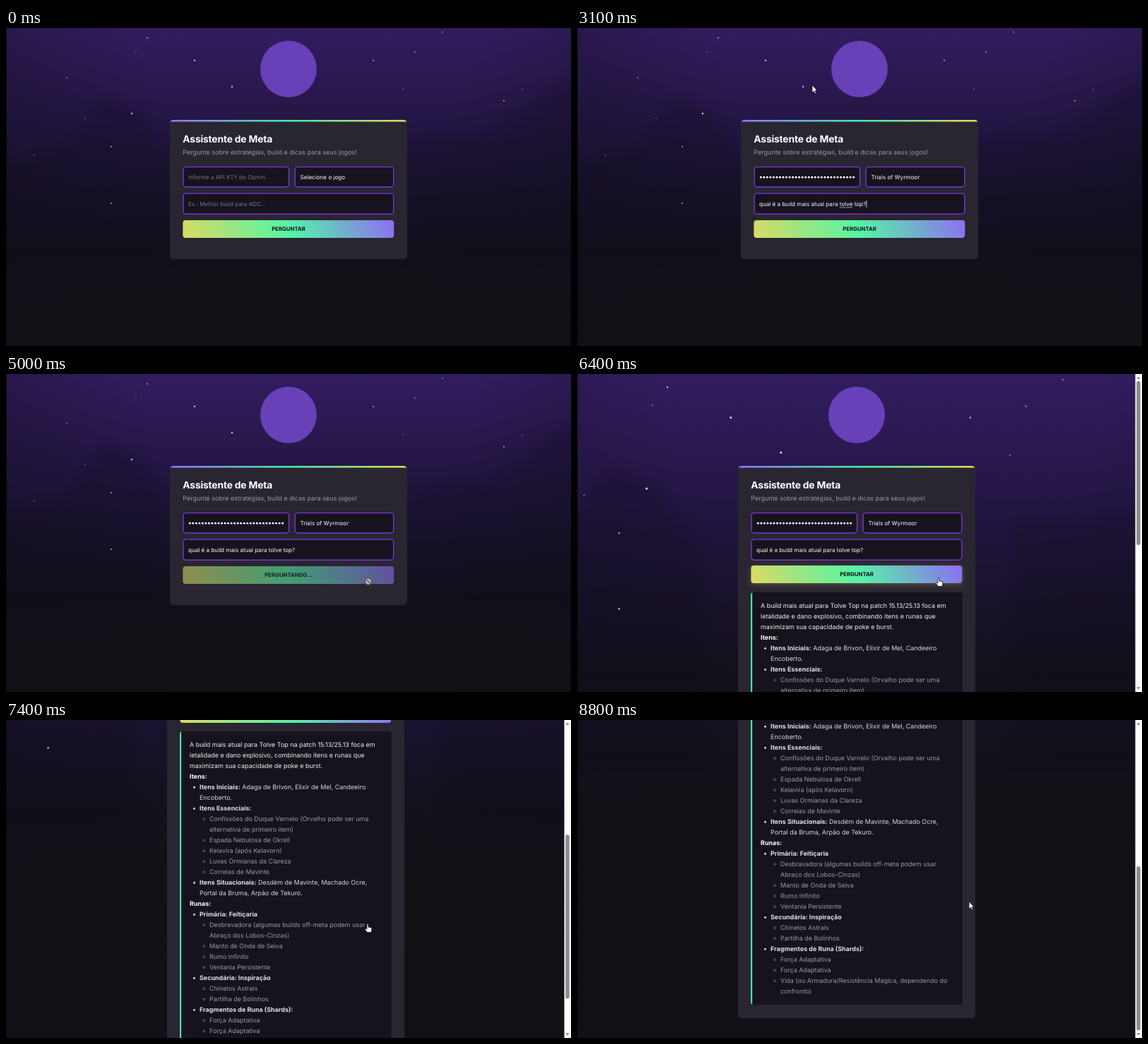
Write an HTML page with a canvas that moves like this. It is 800 px wide and 450 px high and loops after 8.9 s.

```html
<!DOCTYPE html>
<html lang="pt-BR">
<head>
<meta charset="utf-8">
<title>Assistente de Meta</title>
<style>
html, body { margin: 0; width: 100%; height: 100%; overflow: hidden; background: #121214; }
canvas { display: block; width: 800px; height: 450px; }
</style>
</head>
<body>
<canvas id="stage" width="800" height="450"></canvas>
<script>
const ctx = document.getElementById('stage').getContext('2d');
const LOOP = 8900, STEP = 100;
const KEY_AT = 400, SELECT_AT = 1400, FOCUS_AT = 1600, TYPE_END = 2800;
const ASK_AT = 3800, ANSWER_AT = 5900;
const VIEW = 450;
const QUESTION = 'qual é a build mais atual para tolve top?';
const WHITE = '#fafafa', FIELD = '#16131e', VIOLET = '#7936d6';

// Each answer line: level, bold part, regular part, whether it opens a bullet
const ANSWER = [
  [0, '', 'A build mais atual para Tolve Top na patch 15.13/25.13 foca em'],
  [0, '', 'letalidade e dano explosivo, combinando itens e runas que'],
  [0, '', 'maximizam sua capacidade de poke e burst.'],
  [0, 'Itens:', ''],
  [1, 'Itens Iniciais:', ' Adaga de Brivon, Elixir de Mel, Candeeiro', true],
  [1, '', 'Encoberto.'],
  [1, 'Itens Essenciais:', '', true],
  [2, '', 'Confissões do Duque Varnelo (Orvalho pode ser uma', true],
  [2, '', 'alternativa de primeiro item)'],
  [2, '', 'Espada Nebulosa de Okrell', true],
  [2, '', 'Kelavira (após Kelavorn)', true],
  [2, '', 'Luvas Ormianas da Clareza', true],
  [2, '', 'Correias de Mavinte', true],
  [1, 'Itens Situacionais:', ' Desdém de Mavinte, Machado Ocre,', true],
  [1, '', 'Portal da Bruma, Arpão de Tekuro.'],
  [0, 'Runas:', ''],
  [1, 'Primária: Feitiçaria', '', true],
  [2, '', 'Desbravadora (algumas builds off-meta podem usar', true],
  [2, '', 'Abraço dos Lobos-Cinzas)'],
  [2, '', 'Manto de Onda de Seiva', true],
  [2, '', 'Rumo Infinito', true],
  [2, '', 'Ventania Persistente', true],
  [1, 'Secundária: Inspiração', '', true],
  [2, '', 'Chinelos Astrais', true],
  [2, '', 'Partilha de Bolinhos', true],
  [1, 'Fragmentos de Runa (Shards):', '', true],
  [2, '', 'Força Adaptativa', true],
  [2, '', 'Força Adaptativa', true],
  [2, '', 'Vida (ou Armadura/Resistência Mágica, dependendo do', true],
  [2, '', 'confronto)'],
];

const STARS = [[267,46],[200,14],[520,46],[178,121],[149,168],[149,248],[320,83],[705,103],
  [731,87],[86,70],[184,33],[112,128],[618,6],[562,86],[40,180],[579,34]];

// Tracks of [time, values...]
const CURSOR = [[0,318,215],[500,318,215],[900,470,212],[1200,452,242],[1400,452,242],
  [1600,330,249],[2000,330,249],[2700,334,40],[3100,333,81],[3600,512,288],
  [8100,512,288],[8600,555,257]];
const SCROLL = [[0,0],[6500,0],[7400,293],[7700,293],[8400,379]];

function follow(track, t) {
  const next = track.findIndex(p => p[0] > t);
  if (next < 0) return track[track.length - 1].slice(1);
  const a = track[next - 1], b = track[next];
  const u = (t - a[0]) / (b[0] - a[0]), k = u * u * (3 - 2 * u);
  return a.slice(1).map((v, i) => v + (b[i + 1] - v) * k);
}

function box(x, y, w, h, r, fill, stroke) {
  ctx.beginPath();
  ctx.roundRect(x, y, w, h, r);
  if (fill) { ctx.fillStyle = fill; ctx.fill(); }
  if (stroke) { ctx.strokeStyle = stroke; ctx.lineWidth = 1.4; ctx.stroke(); }
}

function dot(x, y, r, fill) {
  ctx.beginPath();
  ctx.arc(x, y, r, 0, Math.PI * 2);
  ctx.fillStyle = fill;
  ctx.fill();
}

// Returns the x where the text ends
function label(str, x, y, size, color, weight = 400, align = 'left') {
  ctx.font = `${weight} ${size}px Inter, sans-serif`;
  ctx.textAlign = align;
  ctx.fillStyle = color;
  ctx.fillText(str, x, y);
  return x + ctx.measureText(str).width;
}

function withStops(gradient, stops) {
  stops.forEach(([at, color]) => gradient.addColorStop(at, color));
  return gradient;
}
const linear = (x0, y0, x1, y1, stops) =>
  withStops(ctx.createLinearGradient(x0, y0, x1, y1), stops);

function backdrop(answered) {
  ctx.save();
  ctx.translate(answered ? 396 : 400, 0);
  if (answered) ctx.scale(1.34, 1.34);
  ctx.translate(-400, 0);
  ctx.fillStyle = linear(0, 0, 0, 619, [[0, '#321c60'], [.1, '#2c1953'], [.25, '#211540'],
    [.4, '#18122a'], [.52, '#131119'], [.65, '#121214'], [1, '#121214']]);
  ctx.fillRect(0, 0, 800, 625);
  ctx.fillStyle = withStops(ctx.createRadialGradient(430, 0, 230, 430, 0, 520),
    [[0, 'rgba(16,13,26,0)'], [1, 'rgba(16,13,26,.38)']]);
  ctx.fillRect(0, 0, 800, 625);

  // Shaded slopes of the landscape on both sides
  ctx.filter = 'blur(6px)';
  ctx.fillStyle = 'rgba(16,13,26,.2)';
  ctx.fill(new Path2D('M90 170L140 100L185 118L235 190V330H-20V200Z'));
  ctx.fill(new Path2D('M565 160L690 150L820 60V330H565Z'));
  ctx.filter = 'none';

  STARS.forEach(([x, y], i) => dot(x, y, i % 3 ? .9 : 1.2, i > 7 ? '#9383b5aa' : '#c9bfe0'));
  ctx.restore();
}

function askButton(t) {
  const asking = t >= ASK_AT && t < ANSWER_AT;
  const hover = !asking && t >= 3500 && t < 6700;
  const y = hover ? 271 : 272;
  ctx.save();
  if (asking) ctx.globalAlpha = .58;
  if (hover) { ctx.shadowColor = 'rgba(225,213,93,.25)'; ctx.shadowBlur = 9; ctx.shadowOffsetY = 2; }
  box(250.4, y, 298.9, 25, 4, linear(270, y + 76, 530, y - 51,
    [[0, '#e1d95f'], [.5, '#55f4a6'], [1, '#9068f6']]));
  ctx.restore();
  label(asking ? 'PERGUNTANDO...' : 'PERGUNTAR', 400, y + 15.4, 7.75,
    asking ? '#17211f' : '#121214', 700, 'center');
}

function form(t) {
  ctx.letterSpacing = '-0.2px';
  label('Assistente de Meta', 250.3, 162.3, 13.9, '#ffffff', 700);
  ctx.letterSpacing = '0px';
  label('Pergunte sobre estratégias, build e dicas para seus jogos!', 250.3, 179.2, 9.02, '#9b97a5');

  box(251.1, 196.6, 149.5, 28.4, 4, FIELD, VIOLET);
  box(409.2, 196.6, 139.6, 28.4, 4, FIELD, VIOLET);
  box(251.1, 234.1, 297.7, 29.1, 4, FIELD, VIOLET);

  if (t < KEY_AT) label('Informe a API KEY do Ozmiri', 258, 213.7, 8.12, '#78747f');
  else {
    ctx.save();
    ctx.beginPath();
    ctx.rect(258, 200, 136, 20);
    ctx.clip();
    for (let i = 0; i < 31; i++) dot(260.3 + i * 4.53, 211.3, 1.45, WHITE);
    ctx.restore();
  }

  label(t < SELECT_AT ? 'Selecione o jogo' : 'Trials of Wyrmoor', 416.5, 213.7, 8.12, WHITE);

  const progress = Math.max(0, Math.min(1, (t - FOCUS_AT) / (TYPE_END - FOCUS_AT)));
  const typed = QUESTION.slice(0, Math.round(QUESTION.length * progress));
  const focused = t >= FOCUS_AT && t < ASK_AT - 100;
  let end = 258;
  if (typed) end = label(typed, 258, 251.6, 8.12, WHITE);
  else label('Ex.: Melhor build para ADC...', 258, 251.6, 8.12, '#78747f');
  if (focused) {
    ctx.fillStyle = WHITE;
    ctx.fillRect(end + .3, 244, .8, 10);
    if (progress === 1) {
      const wordAt = QUESTION.indexOf('tolve');
      const x = 258 + ctx.measureText(QUESTION.slice(0, wordAt)).width;
      ctx.fillStyle = 'rgba(190,185,200,.4)';
      ctx.fillRect(x, 253, ctx.measureText('tolve').width, 2);
    }
  }
  askButton(t);
}

function answer() {
  box(250, 309, 299.5, 473, 4, '#16131c');
  ctx.save();
  ctx.clip();
  ctx.fillStyle = '#46e3aa';
  ctx.fillRect(250, 309, 2.2, 473);
  ctx.restore();
  ANSWER.forEach(([level, bold, plain, bullet], i) => {
    const x = 264 + level * 14, y = 331.2 + i * 15;
    const color = ['#f0f0f2', '#d9d8de', '#9c99a3'][level];
    if (bullet && level === 1) dot(x - 7.5, y - 3, 1.5, color);
    if (bullet && level === 2) {
      ctx.beginPath();
      ctx.arc(x - 7.8, y - 3, 1.4, 0, Math.PI * 2);
      ctx.strokeStyle = color;
      ctx.lineWidth = .6;
      ctx.stroke();
    }
    const end = bold ? label(bold, x, y, 8.96, level ? '#e3e2e7' : '#ffffff', 700) : x;
    label(plain, end, y, 8.96, color);
  });
}

function scrollbar(scroll) {
  ctx.fillStyle = '#fbfbfb';
  ctx.fillRect(790.5, 0, 9.5, VIEW);
  box(792.3, 10 + scroll * .52, 5.4, 232, 2.7, '#8b8b8b');
  for (const [base, tip] of [[7, 3.5], [443, 446.5]]) {
    ctx.beginPath();
    ctx.moveTo(792.5, base);
    ctx.lineTo(797.5, base);
    ctx.lineTo(795, tip);
    ctx.fill();
  }
}

const ARROW = new Path2D('M0 0V10.5L2.4 8.3L4 11.8L5.7 11L4.1 7.6H7.3Z');
const HAND = new Path2D('M-1 1Q0-1 1 1V5L5 5.8Q6.2 6.2 6 8L5 12.5H-.5L-3.8 8.2Q-3.8 6.8-2.2 7.2L-1 8.2Z');
const BEAM = new Path2D('M-1.5-4H1.5M0-4V4M-1.5 4H1.5');

function blockedSign(x, y) {
  dot(x, y, 5, '#b9b1b3');
  ctx.strokeStyle = '#4a4448';
  ctx.lineWidth = 1.2;
  ctx.beginPath();
  ctx.arc(x, y, 4.8, 0, Math.PI * 2);
  ctx.moveTo(x - 2.4, y - 2.4);
  ctx.lineTo(x + 2.4, y + 2.4);
  ctx.stroke();
}

function cursor(t) {
  const [x, y] = follow(CURSOR, t);
  ctx.save();
  ctx.translate(x, y);
  ctx.lineWidth = .8;
  ctx.strokeStyle = '#111';
  ctx.fillStyle = '#fff';
  if (t < 600 || (t >= 1600 && t < 2100)) {
    ctx.strokeStyle = '#050408';
    ctx.stroke(BEAM);
  } else if (t >= ASK_AT && t < ANSWER_AT) {
    blockedSign(1, 5.5);
  } else {
    const shape = t >= 3500 && t < 8200 ? HAND : ARROW;
    ctx.fill(shape);
    ctx.stroke(shape);
  }
  ctx.restore();
}

function draw(t) {
  const answered = t >= ANSWER_AT;
  const [scroll] = follow(SCROLL, t);
  ctx.fillStyle = '#121214';
  ctx.fillRect(0, 0, 800, VIEW);

  ctx.save();
  ctx.translate(0, -scroll);
  backdrop(answered);
  if (answered) ctx.translate(-4, 0);
  dot(400, 58, 40, '#6840b8');
  box(232, 130, 336, answered ? 671 : 197, 5, '#292531');
  ctx.save();
  ctx.clip();
  ctx.fillStyle = linear(232, 0, 568, 0, [[0, '#9572fc'], [.5, '#43e7ad'], [1, '#e1d55d']]);
  ctx.fillRect(232, 130, 336, 2.6);
  ctx.restore();
  form(t);
  if (answered) answer();
  ctx.restore();

  ctx.fillStyle = '#08070b';
  ctx.fillRect(0, 0, 1, VIEW);
  if (answered) scrollbar(scroll);
  cursor(t);
}

ctx.textRendering = 'geometricPrecision';
function tick() {
  draw(Math.floor(performance.now() % LOOP / STEP) * STEP);
  requestAnimationFrame(tick);
}
tick();
</script>
</body>
</html>
```
